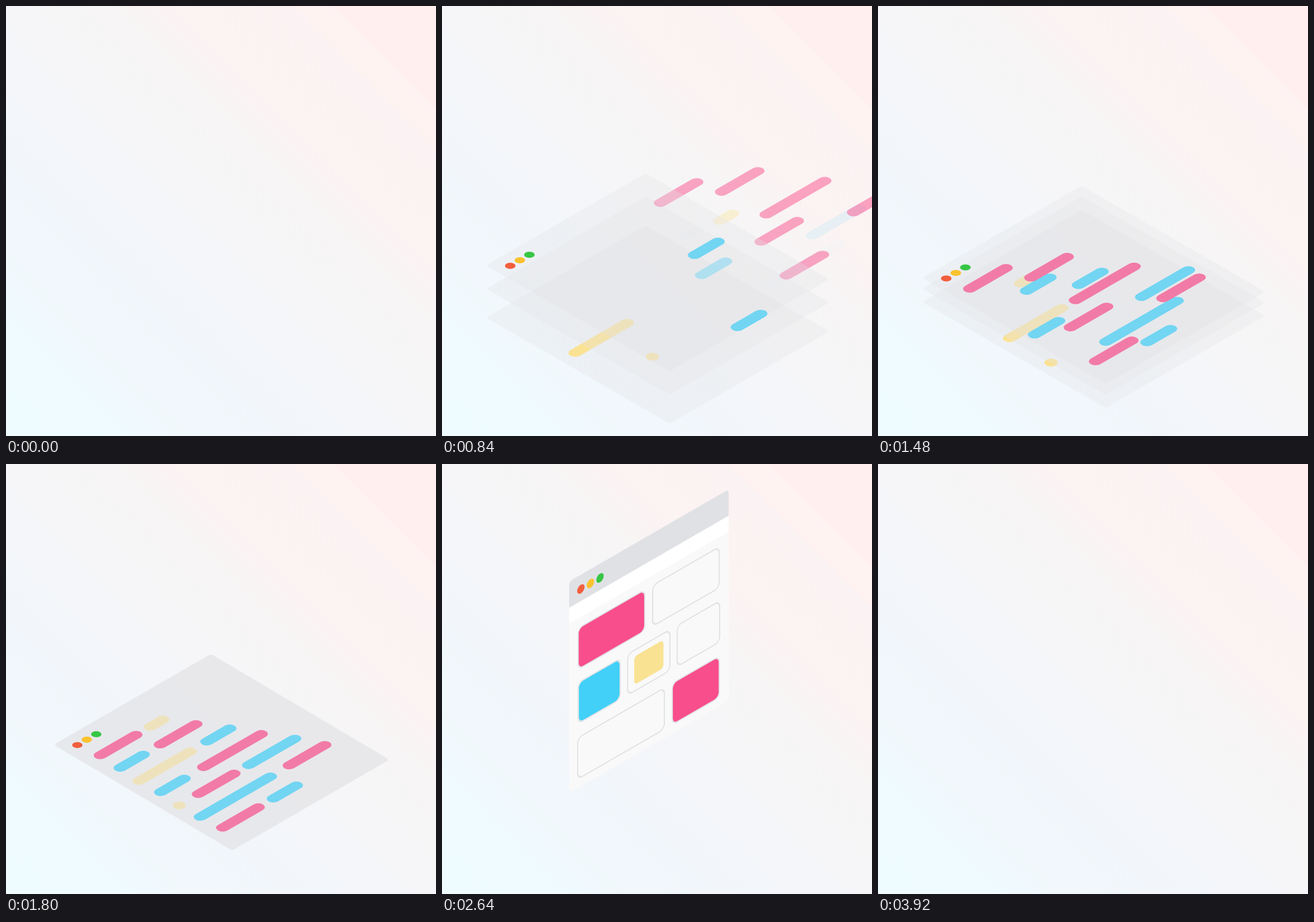
Recreate the animation shown at these times as an HTML page with a canvas. Size 700 by 700 pixels, loop 3960 ms.

```html
<!DOCTYPE html>
<html lang="en">
<head>
<meta charset="utf-8">
<title>Layers to layout</title>
<style>
  html, body { margin: 0; width: 100%; height: 100%; overflow: hidden; }
  body {
    background: linear-gradient(45deg,
      #effcff 0, #effbff 13%, #f1f8fc 21%, #f2f6fb 33%, #f6f6f8 50%, #f7f5f5 62%,
      #fcf3f3 70%, #fbf2f3 83%, #fff3f2 83.6%, #fff2f2 87.8%, #fff0ef 88.2%, #ffefee 100%);
  }
  canvas { display: block; width: 100vw; height: 100vh; }
</style>
</head>
<body>
<canvas id="stage" width="700" height="700"></canvas>
<script>
const LOOP = 3960, STEP = 40;
const W = 300, H = 345, COS = Math.sqrt(3) / 2;
const PINK = '#f84e8b', CYAN = '#42d0f8', YELLOW = '#fae293', GREY = '#e0e1e4';

const canvas = document.getElementById('stage');
const ctx = canvas.getContext('2d');

// Distance and time of the slide for each colour.
const SLIDES = {
  [YELLOW]: { from: 300, time: 800 },
  [CYAN]: { from: 250, time: 1050 },
  [PINK]: { from: 300, time: 800 }
};

// colour, row, centre, length, start
const BARS = [
  [YELLOW, 2, 72.5, 116, 90],
  [YELLOW, 4, 22.7, 18, 297],
  [YELLOW, 0, 134.7, 42, 636],
  [CYAN, 6, 146.3, 62, 98],
  [CYAN, 2, 175, 62, 242],
  [CYAN, 3, 48.5, 63, 526],
  [CYAN, 4, 199, 106, 697],
  [CYAN, 5, 90.4, 152, 781],
  [CYAN, 1, 47, 62, 802],
  [PINK, 0, 61.5, 86, 600],
  [PINK, 1, 137, 86, 600],
  [PINK, 3, 163, 128, 600],
  [PINK, 4, 93, 86, 600],
  [PINK, 5, 227.5, 86, 600],
  [PINK, 6, 61.6, 86, 600]
];

// left, top, right, bottom, colour, start
const CARDS = [
  [16, 84, 143, 152.5, PINK, 2260],
  [156, 84, 283, 152.5, YELLOW, 2640],
  [16, 172.5, 97, 241, CYAN, 2355],
  [109, 172.5, 190.5, 241, YELLOW, 2440],
  [202, 172.5, 284, 241, CYAN, 2800],
  [15, 262, 180, 331, CYAN, 2990],
  [193, 262, 283, 331, PINK, 2310]
];

const DOTS = [[22, '#f25f3e'], [40, '#f9c22e'], [58, '#36c644']];

const clamp = x => Math.min(1, Math.max(0, x));
const ramp = (t, a, b) => clamp((t - a) / (b - a));
const sine = p => (1 - Math.cos(Math.PI * p)) / 2;
const cubic = p => p < .5 ? 4 * p ** 3 : 1 - 4 * (1 - p) ** 3;
const mix = (a, b, p) => a + (b - a) * p;

// Panel coordinates: lying on the floor at p = 0, upright at p = 1.
function setPose(t, lift) {
  const p = cubic(ramp(t, 1720, 2260));
  const s = 1 - .015 * (sine(ramp(t, 1660, 1800)) - sine(ramp(t, 2040, 2260)));
  const yx = mix(COS, 0, p), yy = mix(.5, 1, p);
  const x0 = mix(71.7, 207, p), y0 = mix(460.3, 191, p);
  const cx = x0 + (W * COS + H * yx) / 2, cy = y0 + (H * yy - W * .5) / 2;
  ctx.setTransform(s * COS, -s * .5, s * yx, s * yy,
    cx + (x0 - cx) * s, cy + (y0 - cy) * s + lift);
}

function box(x, y, w, h, r, fill, stroke) {
  ctx.beginPath();
  ctx.roundRect(x, y, w, h, r);
  if (fill) { ctx.fillStyle = fill; ctx.fill(); }
  if (stroke) { ctx.strokeStyle = stroke; ctx.lineWidth = 2; ctx.stroke(); }
}

function drawPlane(t, start) {
  ctx.globalAlpha = .3 * ramp(t, start, start + 300) * (1 - ramp(t, 1980, 2240));
  box(0, 0, W, H, 5, GREY);
}

function drawBars(t, colour) {
  const { from, time } = SLIDES[colour];
  const out = 1 - ramp(t, 1960, 2200);
  for (const [c, row, mid, len, start] of BARS) {
    if (c !== colour) continue;
    const gone = sine(ramp(t, start, start + time));
    ctx.globalAlpha = clamp(gone / .42) * out;
    box(mid + from * (1 - gone) - len / 2, 62.3 + 39.4 * row - 9, len, 18, 9, c);
  }
}

function drawDots(t) {
  ctx.globalAlpha = ramp(t, 0, 320);
  for (const [x, c] of DOTS) box(x - 7, 16.5, 14, 14, 7, c);
}

function drawWindow(t) {
  const a = ramp(t, 2220, 2420);
  if (!a) return;
  ctx.save();
  ctx.globalAlpha = a;
  ctx.beginPath();
  ctx.roundRect(0, 0, W, H, 6);
  ctx.clip();
  for (const [y, h, c] of [[69, H - 69, '#f9f9f9'], [43, 26, '#fff'], [0, 43, GREY]]) {
    ctx.fillStyle = c;
    ctx.fillRect(0, y, W, h);
  }
  ctx.restore();
  for (const [l, top, r, b, c, start] of CARDS) {
    const k = sine(ramp(t, start, start + 320));
    const w = r - l - 2, h = b - top - 2;
    ctx.globalAlpha = 1;
    if (k) box((l + r - w * k) / 2, (top + b - h * k) / 2, w * k, h * k, 9 * k, c);
    ctx.globalAlpha = a;
    box(l + 1, top + 1, w, h, 9, null, GREY);
  }
}

function draw(t) {
  ctx.setTransform(1, 0, 0, 1, 0, 0);
  ctx.clearRect(0, 0, 700, 700);
  canvas.style.opacity = 1 - sine(ramp(t, 3400, 3920));
  const gap = 1 - sine(ramp(t, 1080, 1840));

  setPose(t, 47 * gap);
  drawPlane(t, 0);
  drawBars(t, YELLOW);

  setPose(t, 0);
  drawPlane(t, 70);
  drawBars(t, CYAN);

  setPose(t, -38 * gap);
  drawBars(t, PINK);
  drawPlane(t, 140);
  drawWindow(t);
  drawDots(t);
}

const begin = performance.now();
function tick() {
  const t = (performance.now() - begin) % LOOP;
  draw(Math.floor(t / STEP) * STEP);
  requestAnimationFrame(tick);
}
tick();
</script>
</body>
</html>
```
